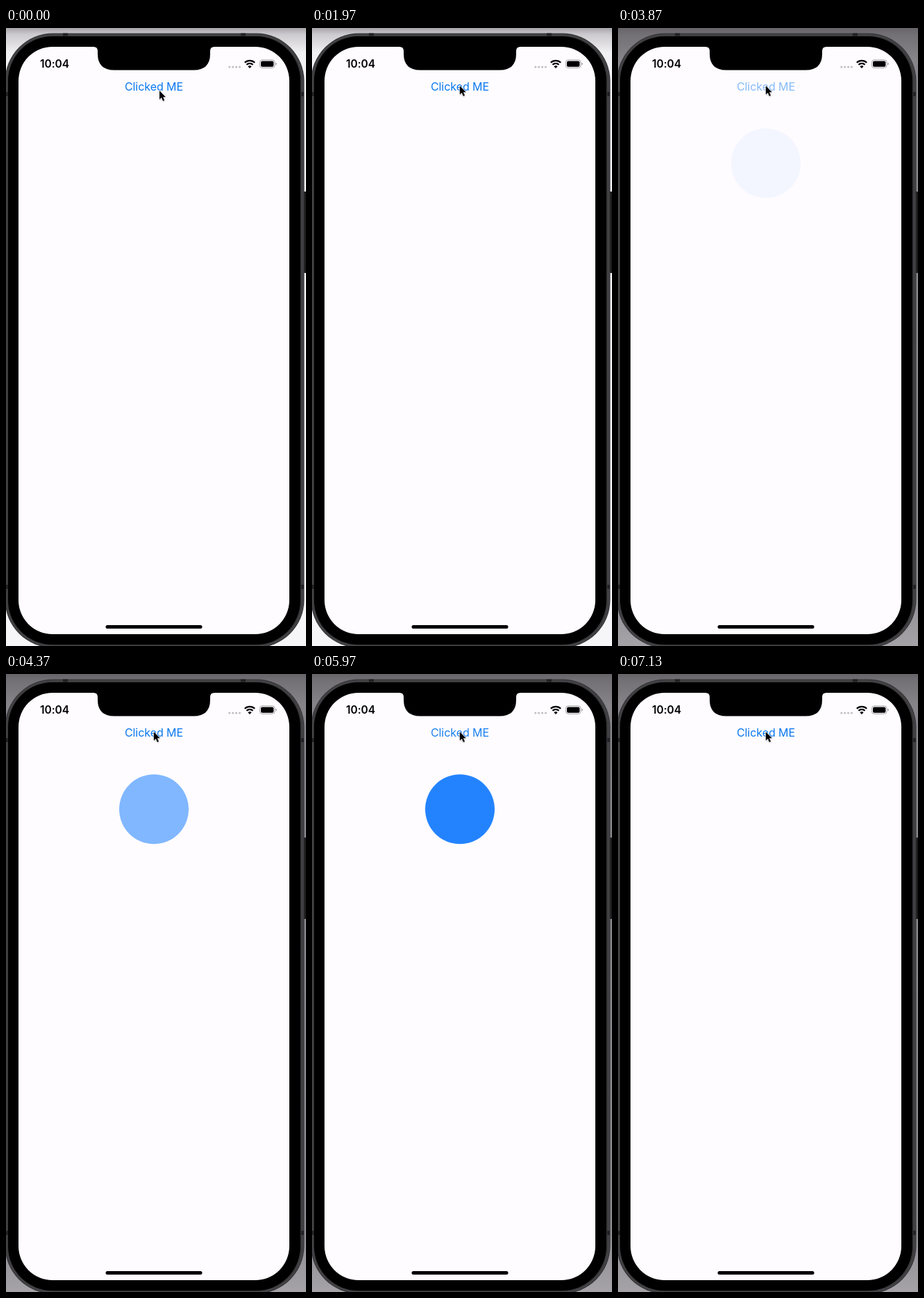
An HTML page for the animation above (8000 ms loop, 432x888 px).

```html
<!DOCTYPE html>
<html lang="en">
<head>
<meta charset="utf-8">
<title>Fading circle</title>
<style>
  html, body { margin: 0; width: 100%; height: 100%; overflow: hidden; background: #f4f3f5; }
  svg { display: block; width: 432px; height: 888px; }
  text { font-family: Inter, Roboto, "Liberation Sans", sans-serif; }
  #time { font-size: 15.5px; font-weight: 600; letter-spacing: -.1px; }
  #label { font-size: 16px; letter-spacing: -.05px; fill: #0878ef; }
  #dot { opacity: 0; }
</style>
</head>
<body>
<svg viewBox="0 0 432 888">
  <defs>
    <linearGradient id="soft" x2="0" y2="1">
      <stop offset="0" stop-color="#a5a3a7"/>
      <stop offset=".01" stop-color="#cbc9cd"/>
      <stop offset=".04" stop-color="#f1f0f2"/>
      <stop offset="1" stop-color="#f6f5f7"/>
    </linearGradient>
    <linearGradient id="deep" x2="0" y2="1">
      <stop offset="0" stop-color="#666468"/>
      <stop offset=".01" stop-color="#727074"/>
      <stop offset=".05" stop-color="#868488"/>
      <stop offset=".9" stop-color="#8c8a8e"/>
      <stop offset="1" stop-color="#a5a3a7"/>
    </linearGradient>
    <filter id="blur" x="-1" y="-1" width="3" height="3"><feGaussianBlur stdDeviation="1"/></filter>
  </defs>

  <rect width="432" height="888" fill="url(#soft)"/>
  <rect id="shade" width="432" height="888" fill="url(#deep)" opacity="0"/>

  <!-- phone body -->
  <rect x="428" y="235" width="6" height="117" rx="1.5" fill="#1b1a1b"/>
  <rect x="-1.5" y="7.5" width="431" height="883" rx="69" fill="#39383b"/>
  <rect x="1" y="10" width="426" height="878" rx="66" fill="none" stroke="#4d4c4f"/>
  <g fill="#222124">
    <rect x="82" y="7.5" width="7" height="4"/>
    <rect x="338" y="7.5" width="7" height="4"/>
    <rect y="92" width="3" height="6"/>
    <rect y="800" width="3" height="6"/>
    <rect x="425" y="92" width="4" height="6"/>
    <rect x="425" y="800" width="4" height="6"/>
  </g>
  <rect x="3" y="12" width="421" height="874" rx="64"/>
  <rect x="18" y="27" width="390" height="844" rx="49" fill="#fefcff"/>
  <path d="M126 26V27Q132 27 132 33V37Q132 60.5 156 60.5H270Q294 60.5 294 37V33Q294 27 300 27V26Z"/>
  <rect x="143.5" y="858" width="139" height="5" rx="2.5"/>

  <!-- status bar -->
  <text id="time" x="70" y="57.3" text-anchor="middle">10:04</text>
  <path d="M321.8 56H337" stroke="#c1bfc3" stroke-width="3.2" stroke-linecap="round" stroke-dasharray="0 4.9"/>
  <g fill="none" stroke="#000" stroke-width="2.2">
    <path d="M343.8 49.8a10.3 10.3 0 0 1 14.4 0"/>
    <path d="M346.4 52.8a6.5 6.5 0 0 1 9.2 0"/>
  </g>
  <path d="M351 58L348.4 55.2a3.7 3.7 0 0 1 5.2 0Z"/>
  <rect x="365.4" y="45.9" width="21.6" height="11.4" rx="3.4" fill="none" stroke="#a5a3a7"/>
  <rect x="367" y="47.5" width="18.4" height="8.2" rx="2"/>
  <path d="M388.4 49.6q1.6 .6 1.6 2t-1.6 2Z" fill="#a5a3a7"/>

  <!-- content -->
  <text id="label" x="213" y="90.4" text-anchor="middle">Clicked ME</text>
  <circle id="dot" cx="213" cy="194.3" r="50" fill="#0070ff"/>

  <g id="cursor">
    <path d="M0 1V14L3 11.5L5.3 16L7.5 15L5.5 10.3H9Z" opacity=".3" filter="url(#blur)"/>
    <path d="M0 0V12.7L2.9 10L5.1 15L7.2 14.1L5.1 9.2H9Z" stroke="#fff" stroke-width="1.3" stroke-linejoin="round" paint-order="stroke"/>
  </g>
</svg>
<script>
  const LOOP = 8000;
  const easeIn = "cubic-bezier(.333,0,.667,.333)";
  const easeOut = "cubic-bezier(.2,.6,.4,1)";

  // Each step: [ms, value, easing towards the next step]
  function play(id, prop, steps) {
    const frames = steps.map(([ms, value, easing = "linear"]) =>
      ({ offset: ms / LOOP, [prop]: value, easing }));
    document.getElementById(id).animate(frames, { duration: LOOP, iterations: Infinity });
  }
  const at = (x, y) => `translate(${x}px, ${y}px)`;

  play("cursor", "transform", [
    [0, at(221, 90)], [990, at(221, 90)],
    [990, at(218, 86.5)], [1005, at(218, 86.5), easeOut],
    [1250, at(212.8, 83)], [LOOP, at(212.8, 83)]
  ]);
  play("shade", "opacity", [
    [0, 0], [3620, 0], [3620, 1], [LOOP, 1]
  ]);
  play("label", "opacity", [
    [0, 1], [3620, 1], [3620, .25], [3690, .25, "ease-in-out"], [4150, 1],
    [5460, 1], [5460, .25], [5600, .25, "ease-in-out"], [6070, 1], [LOOP, 1]
  ]);
  play("dot", "opacity", [
    [0, 0], [3670, 0, easeIn], [4670, 1],
    [5603, 1, easeIn], [6595, 0], [LOOP, 0]
  ]);
</script>
</body>
</html>
```
